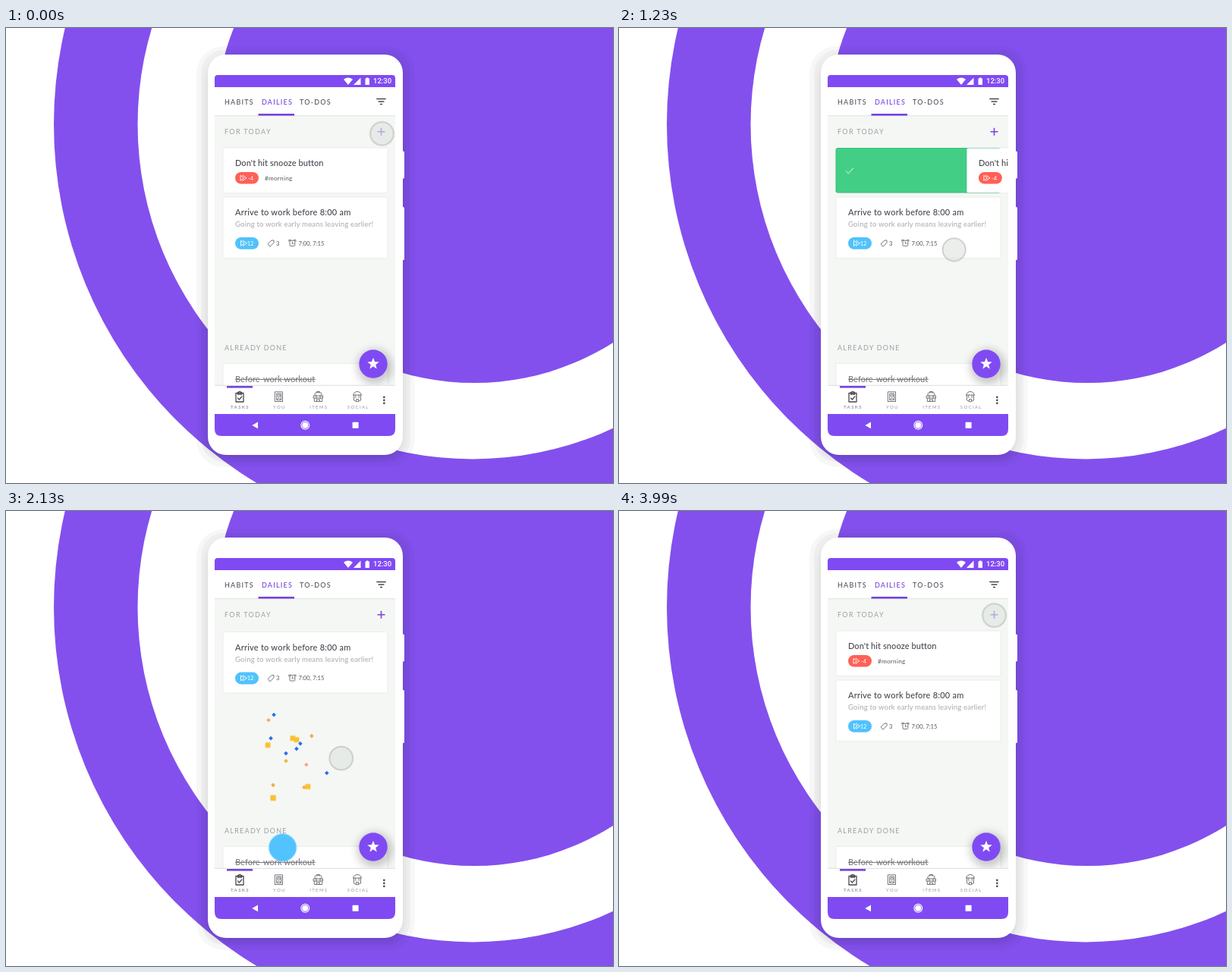
Animation of 800x600 px, one loop 4.02 s. Source, as an HTML page:

```html
<!DOCTYPE html>
<html lang="en">
<head>
<meta charset="utf-8">
<title>Daily tasks</title>
<style>
html, body { margin: 0; width: 100%; height: 100%; overflow: hidden; background: #fff; }
svg { display: block; width: 800px; height: 600px; font-family: Lato, "Noto Sans", sans-serif; }
.purple { fill: #8350ee; }
.bar { fill: #804af3; }
.tab { font-size: 9px; font-weight: 500; letter-spacing: 1.2px; fill: #55515d; }
.active { fill: #7443df; }
.head { font-size: 9px; letter-spacing: 1.33px; fill: #a09ea6; }
.title { font-size: 11px; font-weight: 500; letter-spacing: .16px; fill: #49454f; }
.note { font-size: 9.6px; letter-spacing: .15px; fill: #aaa8af; }
.meta { font-size: 7.6px; fill: #57535c; }
.nav { font-size: 6px; letter-spacing: 1.35px; text-anchor: middle; fill: #96939b; }
.line { fill: none; stroke: #77747c; stroke-width: 1; stroke-linejoin: round; stroke-linecap: round; }
.white { fill: #fff; }
.card { fill: #fff; filter: drop-shadow(0 .5px 1px rgba(60, 70, 60, .13)); }

.swipe, .lift, .tile, .check, .praise, .badge, .fresh, .touch, .bit {
  animation: 4020ms linear infinite;
}
.touch { animation-name: touch; }
.swipe { animation-name: swipe; }
.lift { animation-name: lift; }
.tile { animation-name: tile; }
.check { animation-name: check; }
.praise { animation-name: praise; }
.badge { animation-name: badge; }
.fresh { animation-name: fresh; }
.bit { animation-name: bit; }

@keyframes touch {
  0%, 6.72% { transform: translate(495.5px, 139.3px); animation-timing-function: ease-in-out; }
  17.2%, 18.66% { transform: translate(353px, 206px) scale(.94); animation-timing-function: ease-in-out; }
  25.37%, 26.87% { transform: translate(442px, 206px) scale(.94); animation-timing-function: ease-in-out; }
  32.84% { transform: translate(441.5px, 327px); }
  38.81% { transform: translate(441.5px, 327px); }
  68.66%, 72.14% { transform: translate(442px, 325px); animation-timing-function: ease-in-out; }
  82.1%, 84% { transform: translate(494.5px, 137.5px) scale(.95); }
  90%, 99.25% { transform: translate(494.5px, 137.5px); }
  100% { transform: translate(495.5px, 139.3px); }
}
@keyframes swipe {
  0%, 18.66% { transform: none; animation-timing-function: ease-in-out; }
  25.37%, 26.87% { transform: translateX(89px); animation-timing-function: ease-in; }
  32.09%, 100% { transform: translateX(232px); }
}
@keyframes lift {
  0%, 47.3% { transform: none; animation-timing-function: ease-in-out; }
  53.6%, 100% { transform: translateY(-64.5px); }
}
@keyframes tile {
  0%, 18.66% { opacity: 0; }
  18.7% { opacity: 1; }
  18.7%, 32.09% { fill: #43ce86; stroke: #36bd78; }
  34.83%, 100% { fill: #52c3ff; stroke: #52c3ff; }
  0%, 46.27% { x: 286px; y: 158.5px; width: 216.5px; height: 58.5px; rx: 2px; transform: none; animation-timing-function: ease-in-out; }
  49.25% { x: 375px; y: 169.5px; width: 36px; height: 36px; rx: 18px; transform: none; animation-timing-function: ease-in; }
  52.99% { x: 375px; y: 169.5px; width: 36px; height: 36px; rx: 18px; transform: translate(-28.4px, 256px); opacity: 1; }
  55.2% { x: 392px; y: 186.5px; width: 2px; height: 2px; rx: 1px; transform: translate(-28.4px, 293px); opacity: 1; }
  55.3%, 100% { x: 392px; y: 186.5px; width: 2px; height: 2px; rx: 1px; opacity: 0; }
}
@keyframes check {
  0%, 21% { transform: translate(304px, 188px) scale(0); opacity: 1; }
  23.9%, 29% { transform: translate(304px, 188px); opacity: 1; }
  32%, 100% { transform: translate(304px, 188px); opacity: 0; }
}
@keyframes praise {
  0%, 33.6% { opacity: 0; transform: translateY(4px); animation-timing-function: ease-out; }
  36.6%, 46.27% { opacity: 1; transform: none; }
  47.8%, 100% { opacity: 0; transform: none; }
}
@keyframes badge {
  0%, 58.9% { transform: translate(365.7px, 480.7px) scale(0); opacity: 1; }
  61.2% { transform: translate(365.7px, 480.7px) scale(1.25); }
  63%, 91% { transform: translate(365.7px, 480.7px); opacity: 1; }
  97.8%, 100% { transform: translate(365.7px, 480.7px); opacity: 0; }
}
@keyframes fresh {
  0%, 91% { opacity: 0; }
  97.8%, 100% { opacity: 1; }
}
@keyframes bit {
  0%, 36.3% { transform: translate(393px, 188px) scale(0); animation-timing-function: ease-out; }
  38.81% { transform: translate(var(--burst)); animation-timing-function: ease-out; }
  45.8% { transform: translate(var(--wide)); animation-timing-function: ease-in; }
  52.99% { transform: translate(var(--fall)); }
  58.5% { transform: translate(363px, 482px) scale(.5); }
  58.6%, 100% { transform: translate(363px, 482px) scale(0); }
}
</style>
</head>
<body>
<svg viewBox="0 0 800 600">
  <defs>
    <clipPath id="screen"><path d="M279 62H509Q513 62 513 66V529Q513 538 504 538H284Q275 538 275 529V66Q275 62 279 62Z"/></clipPath>
    <filter id="soft" x="-60%" y="-60%" width="220%" height="220%"><feGaussianBlur stdDeviation="6"/></filter>
    <path id="level" d="M0 0L4.6 3.5 0 7ZM3 0.8V0L8 3.5 3 7V6" fill="none" stroke="#fff" stroke-width=".9" stroke-linejoin="round"/>
    <g id="first">
      <rect class="card" x="286.5" y="158.5" width="216" height="58.5" rx="1.5"/>
      <text class="title" x="302" y="182" style="letter-spacing:.08px">Don't hit snooze button</text>
      <rect x="302" y="190" width="31" height="15.6" rx="7.8" fill="#ff6056"/>
      <use href="#level" x="309" y="194.3"/>
      <text class="meta white" x="319" y="200.6">-4</text>
      <text class="meta" x="341" y="201" style="font-size:8.2px;letter-spacing:.25px">#morning</text>
    </g>
    <g id="second">
      <rect class="card" x="286.5" y="223.5" width="216" height="79.5" rx="1.5"/>
      <text class="title" x="302" y="247" style="letter-spacing:.22px">Arrive to work before 8:00 am</text>
      <text class="note" x="302" y="262">Going to work early means leaving earlier!</text>
      <rect x="302" y="276" width="31" height="15.8" rx="7.9" fill="#50c2fb"/>
      <use href="#level" x="309.5" y="280.3"/>
      <text class="meta white" x="317.7" y="286.6">12</text>
      <g class="line" stroke-width=".9">
        <path d="M345.5 284.5L350 280H353V283.2L348.2 288Z"/>
        <rect x="374" y="280.2" width="6.8" height="7.2" rx="1"/>
        <path d="M372.8 281.2V279.5H375M379.8 279.5H382V281.2M377.3 282V284.3H379"/>
      </g>
      <text class="meta" x="356" y="286.8">3</text>
      <text class="meta" x="385.5" y="286.8">7:00, 7:15</text>
    </g>
  </defs>

  <circle class="purple" cx="615" cy="127" r="552"/>
  <circle class="white" cx="615" cy="127" r="441.5"/>
  <circle class="purple" cx="617" cy="126.8" r="341.3"/>

  <g fill="#000">
    <rect x="251" y="24" width="287.5" height="555" rx="36" opacity=".03"/>
    <rect x="257" y="29" width="276" height="543" rx="30" opacity=".03"/>
    <rect x="267" y="42" width="255" height="524" rx="24" opacity=".13" filter="url(#soft)"/>
  </g>
  <g class="white">
    <rect x="515" y="162.5" width="10" height="36" rx="1.5"/>
    <rect x="515" y="236" width="10" height="70" rx="1.5"/>
    <rect x="266" y="35" width="257" height="528" rx="24"/>
  </g>

  <g clip-path="url(#screen)">
    <rect x="275" y="62" width="238" height="476" fill="#f5f7f5"/>
    <text class="head" x="288" y="140">FOR TODAY</text>
    <path d="M489.5 136.8H499.5M494.5 131.8V141.8" stroke="#7744e4" stroke-width="1.6"/>
    <text class="head" x="288" y="425" style="letter-spacing:1.25px">ALREADY DONE</text>
    <rect class="card" x="286.5" y="443" width="216" height="40"/>
    <text class="title" x="302" y="467" fill-opacity=".72" style="letter-spacing:.05px">Before-work workout</text>
    <path d="M302 463.5H408" stroke="#77747c" stroke-width=".9"/>

    <g class="lift"><use href="#second"/></g>
    <rect class="tile" x="286" y="158.5" width="216.5" height="58.5" rx="2"/>
    <path class="check" d="M-5 .5L-1.7 3.7 5 -3.4" fill="none" stroke="#fff" stroke-width="1.5"/>
    <g class="swipe"><use href="#first"/></g>

    <g class="praise white">
      <text x="394" y="182" font-size="11" letter-spacing=".2" text-anchor="middle">Way to go!</text>
      <text x="369" y="200" font-size="9">+ 0.86</text>
      <text x="427" y="200" font-size="9">+ 5</text>
      <circle cx="355.6" cy="197" r="8" fill="#f49b2c"/>
      <circle cx="355.6" cy="197" r="5.6" fill="#ffc84f" stroke="#c9751c" stroke-width=".8"/>
      <path d="M353.5 194.5H358M353.5 199.5H358M355.6 194.5V199.5" stroke="#c9751c"/>
      <path d="M413.6 189.5L416.4 194.2 421.1 197 416.4 199.8 413.6 204.5 410.8 199.8 406.1 197 410.8 194.2Z" fill="#ffb637"/>
      <path d="M413.6 189.5L416.4 194.2 413.6 197ZM421.1 197L416.4 199.8 413.6 197ZM413.6 204.5L410.8 199.8 413.6 197ZM406.1 197L410.8 194.2 413.6 197Z" fill="#f28e24"/>
    </g>

    <g class="fresh">
      <rect x="275" y="150" width="238" height="160" fill="#f5f7f5"/>
      <use href="#first"/><use href="#second"/>
    </g>

    <circle cx="486" cy="447" r="23" opacity=".22" filter="url(#soft)"/>
    <circle cx="484" cy="443" r="18.7" class="bar"/>
    <path class="white" d="M484 434.8L486 440.1 491.7 440.4 487.2 443.9 488.7 449.4 484 446.3 479.3 449.4 480.8 443.9 476.3 440.4 482 440.1Z"/>

    <rect class="bar" x="275" y="62" width="238" height="16"/>
    <g class="white">
      <path d="M445 67.8Q451 63.2 457 67.8L451 75Z"/>
      <path d="M467.5 65.5V75H458Z"/>
      <path d="M473.5 66.5H475V65.5H477.5V66.5H479V75H473.5Z"/>
      <text x="484" y="73.4" font-family="Roboto, sans-serif" font-size="9.5" font-weight="500">12:30</text>
    </g>
    <rect x="275" y="115" width="238" height="1.2" fill="#e4e6e5"/>
    <rect class="white" x="275" y="78" width="238" height="37"/>
    <text class="tab" x="288" y="100.6">HABITS</text>
    <text class="tab active" x="337" y="100.6">DAILIES</text>
    <text class="tab" x="387" y="100.6">TO-DOS</text>
    <rect class="active" x="332.5" y="113" width="47.5" height="2.6"/>
    <path d="M488.3 93.5H500.7M490.6 97H498.4M493 100.5H496" stroke="#49454f" stroke-width="1.4"/>

    <rect x="275" y="470.7" width="238" height="1.4" fill="#e2e4e3"/>
    <rect class="white" x="275" y="472" width="238" height="37"/>
    <rect class="active" x="291" y="472" width="34" height="2.6"/>
    <g class="line">
      <path d="M303 481.5H313V493H303ZM305.5 483.2H310.5V480.5L308 479.3 305.5 480.5ZM305.5 488L307.4 490 310.8 486" stroke="#49454f" stroke-width="1.3"/>
      <path d="M354.7 479.8H364.5V492.5H354.7ZM356.7 490V482H362.6V490ZM357 489.8Q359.6 486 362.3 489.8M354.7 492.5H364.5"/>
      <circle cx="359.6" cy="484.8" r="1.6"/>
      <path d="M407 485V482.5Q407 480.8 409 480.8H414Q416 480.8 416 482.5V485M409.5 480.8V479.5H413.5V480.8M405.5 485H417.5V488H405.5ZM406.3 488V492.5H416.7V488M409 484V489M414 484V489M409.5 492V490H413.5V492"/>
      <path d="M458.5 484V491L463 493 467.5 491V484M457.5 483.7L459.5 480.5 463 479.3 466.5 480.5 468.5 483.7ZM460.8 484V487.5M465.2 484V487.5M461.5 492V489.5H464.5V492"/>
    </g>
    <text class="nav active" x="308.5" y="502" font-weight="700">TASKS</text>
    <text class="nav" x="360.5" y="502">YOU</text>
    <text class="nav" x="412.3" y="502">ITEMS</text>
    <text class="nav" x="464.3" y="502">SOCIAL</text>
    <g fill="#49454f"><circle cx="498.3" cy="486.8" r="1.35"/><circle cx="498.3" cy="490.8" r="1.35"/><circle cx="498.3" cy="494.8" r="1.35"/></g>
    <g class="badge">
      <rect x="-4" y="-4.2" width="8" height="8.4" rx="1.8" fill="#ff6056"/>
      <text class="white" y="2.2" font-size="6" text-anchor="middle">1</text>
    </g>

    <rect class="bar" x="275" y="509" width="238" height="29"/>
    <g class="white">
      <path d="M332 519.5V528.3L324.3 523.9Z"/>
      <circle cx="394.3" cy="523.8" r="4"/>
      <circle cx="394.3" cy="523.8" r="5.4" fill="none" stroke="#fff" stroke-width="1.1"/>
      <rect x="456.6" y="519.8" width="8" height="8" rx=".6"/>
    </g>
    <g id="bits"></g>
  </g>

  <circle class="touch" r="15.4" fill="#dfe3df" fill-opacity=".62" stroke="#8f9692" stroke-opacity=".42" stroke-width="1.8"/>
</svg>
<script>
// Six clusters: centre, tangent angle, then where the warm, square and blue bits fall.
const clusters = [
  [393, 149.5, 0, [369, 329], [378, 299], [383, 313]],
  [447, 165, 37, [403, 296], [383, 301], [388, 306]],
  [447, 210, 147, [396, 334], [398, 363], [423, 345]],
  [393, 225, 180, [393, 364], [352, 378], [369, 319]],
  [341, 211, 213, [352, 361], [352, 378], [349, 299]],
  [340, 164, 321, [346, 275], [345, 308], [353, 268]]
];
const warm = ['#f9b233', '#f5a848', '#ffa473'];
const bits = document.getElementById('bits');
const px = (x, y) => `${x}px, ${y}px`;

function addBit(size, fill, turn, x, y, fall) {
  const rect = document.createElementNS('http://www.w3.org/2000/svg', 'rect');
  const attrs = { x: -size / 2, y: -size / 2, width: size, height: size, fill, transform: `rotate(${turn})` };
  for (const key in attrs) rect.setAttribute(key, attrs[key]);
  const g = document.createElementNS('http://www.w3.org/2000/svg', 'g');
  g.setAttribute('class', 'bit');
  g.style.setProperty('--burst', px(x, y));
  g.style.setProperty('--wide', px(393 + (x - 393) * 1.5, 188 + (y - 188) * 1.7));
  g.style.setProperty('--fall', px(...fall));
  g.append(rect);
  bits.append(g);
}

clusters.forEach(([x, y, angle, ...falls], i) => {
  const a = angle * Math.PI / 180, dx = 10.6 * Math.cos(a), dy = 10.6 * Math.sin(a);
  addBit(4, warm[i % 3], 45, x - dx, y - dy, falls[0]);
  addBit(6.8, '#fbc02f', 0, x, y, falls[1]);
  addBit(4, '#2a6df0', 45, x + dx, y + dy, falls[2]);
});
</script>
</body>
</html>
```
